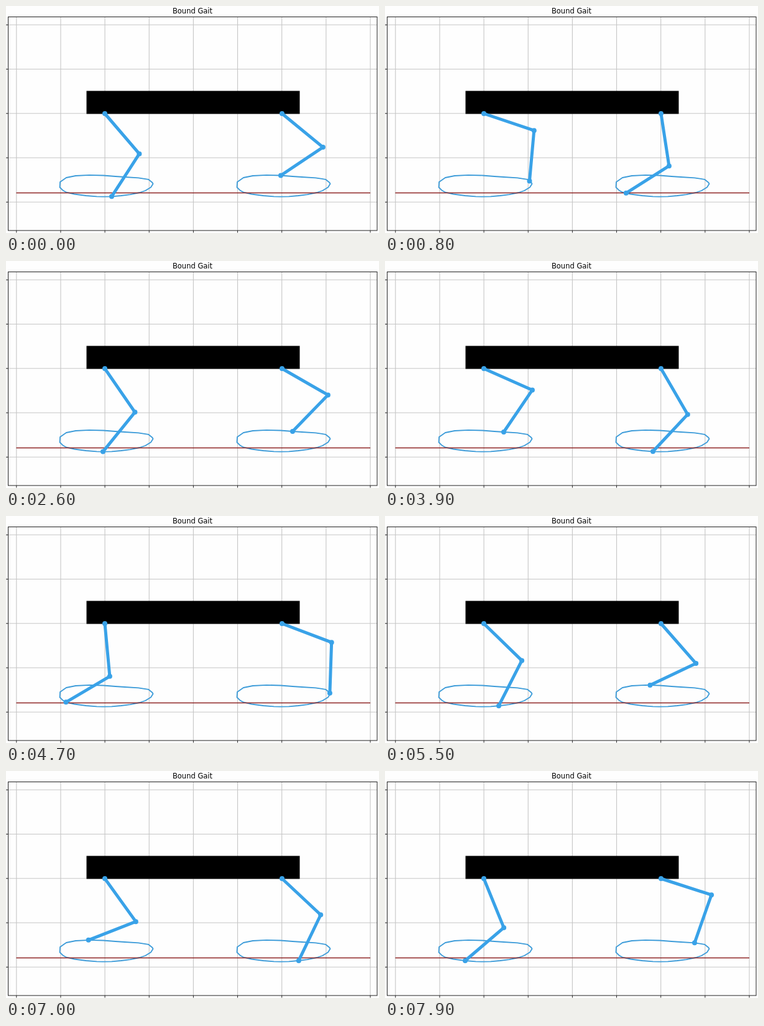
Recreate the animation shown at these times as an HTML page. Size 600 by 365 pixels, loop 8 s.

```html
<!DOCTYPE html>
<html lang="en">
<head>
<meta charset="utf-8">
<title>Bound Gait</title>
<style>
  html, body { margin: 0; width: 100%; height: 100%; overflow: hidden; background: #fefefe; }
  svg { display: block; width: 600px; height: 365px; }
  text { font: 11.5px "DejaVu Sans", sans-serif; fill: #000; text-anchor: middle; }
  .grid { stroke: #c6c6c6; stroke-width: 1.1; }
  .axis { stroke: #222; stroke-width: 1; fill: none; }
  .path { stroke: #3d9cd9; stroke-width: 1.8; fill: none; stroke-linejoin: round; }
  .ground { stroke: #8c2222; stroke-width: 1.3; }
  .leg { stroke: #39a2e8; stroke-width: 5; fill: none; stroke-linejoin: round; stroke-linecap: round; }
  .joint { fill: #39a2e8; }
</style>
</head>
<body>
<svg id="stage" viewBox="0 0 600 365"></svg>
<script>
const stage = document.getElementById('stage');
const LOOP = 8000, STEP = 100;
const THIGH = 85.2, SHIN = 81.7, HIP_Y = 173;

// Foot track relative to the hip: rightwards along the bottom, back over the top.
const track = [
  [86.5, 291.5], [92, 296.8], [96.5, 299.3], [110, 302.5], [129, 305], [146, 306.3],
  [156, 306.6], [170, 306.3], [185, 305], [200, 303.2], [215, 300], [224, 297],
  [233, 291.5], [236.5, 286], [235.5, 284], [229, 278.8], [213, 276.3], [191, 275],
  [176, 274], [157, 272.5], [134, 271.8], [112, 273], [97, 276], [87, 283]
].map(([x, y]) => [x - 159, y]);

// Steps at which the distance along the track is given for each leg.
const steps = [0, 15, 26, 39, 47, 62, 79];
const legs = [
  { hip: 159, at: [7, 21, 30, 41, 50, 61, 76] },
  { hip: 444, at: [19, 33, 42, 53, 61.6, 73, 88] }
];

function add(tag, attrs) {
  const el = document.createElementNS('http://www.w3.org/2000/svg', tag);
  for (const k in attrs) el.setAttribute(k, attrs[k]);
  return stage.appendChild(el);
}
const line = (cls, x1, y1, x2, y2) => add('line', { class: cls, x1, y1, x2, y2 });

function drawScene() {
  const xs = Array.from({ length: 9 }, (_, i) => 16.8 + i * 71.15);
  const ys = Array.from({ length: 5 }, (_, i) => 30.3 + i * 71.25);
  xs.forEach(x => line('grid', x, 17, x, 361));
  ys.forEach(y => line('grid', 4, y, 597, y));
  xs.forEach(x => line('axis', x, 361, x, 364.5));
  ys.forEach(y => line('axis', 0, y, 3.5, y));
  add('rect', { class: 'axis', x: 3.5, y: 17.5, width: 593.5, height: 343.5 });
  add('text', { x: 300, y: 11.5 }).textContent = 'Bound Gait';
  add('rect', { x: 129.5, y: 136.5, width: 343, height: 37 });
  for (const leg of legs) {
    const points = track.map(([x, y]) => [x + leg.hip, y]).join(' ');
    add('polygon', { class: 'path', points });
  }
  line('ground', 16.5, 300.5, 586, 300.5);
  for (const leg of legs) {
    leg.bones = add('polyline', { class: 'leg' });
    leg.joints = [0, 1, 2].map(() => add('circle', { class: 'joint', r: 4 }));
  }
}

function progress(at, n) {
  let i = 0;
  while (i < steps.length - 2 && n > steps[i + 1]) i++;
  return at[i] + (at[i + 1] - at[i]) * (n - steps[i]) / (steps[i + 1] - steps[i]);
}

function footAt(p) {
  const i = Math.floor(p), f = p - i;
  const a = track[i % track.length], b = track[(i + 1) % track.length];
  return [a[0] + (b[0] - a[0]) * f, a[1] + (b[1] - a[1]) * f];
}

// Two-bone solve with the knee always on the right.
function pose(leg, n) {
  const [fx, fy] = footAt(progress(leg.at, n));
  const dy = fy - HIP_Y, d = Math.hypot(fx, dy);
  const cos = (THIGH * THIGH + d * d - SHIN * SHIN) / (2 * THIGH * d);
  const angle = Math.atan2(dy, fx) - Math.acos(Math.min(1, cos));
  const points = [
    [leg.hip, HIP_Y],
    [leg.hip + THIGH * Math.cos(angle), HIP_Y + THIGH * Math.sin(angle)],
    [leg.hip + fx, fy]
  ];
  leg.bones.setAttribute('points', points.join(' '));
  leg.joints.forEach((joint, i) => {
    joint.setAttribute('cx', points[i][0]);
    joint.setAttribute('cy', points[i][1]);
  });
}

function render(time) {
  const n = Math.floor((time % LOOP) / STEP);
  legs.forEach(leg => pose(leg, n));
}

drawScene();
render(0);
const start = performance.now();
function tick() {
  render(performance.now() - start);
  requestAnimationFrame(tick);
}
requestAnimationFrame(tick);
</script>
</body>
</html>
```
